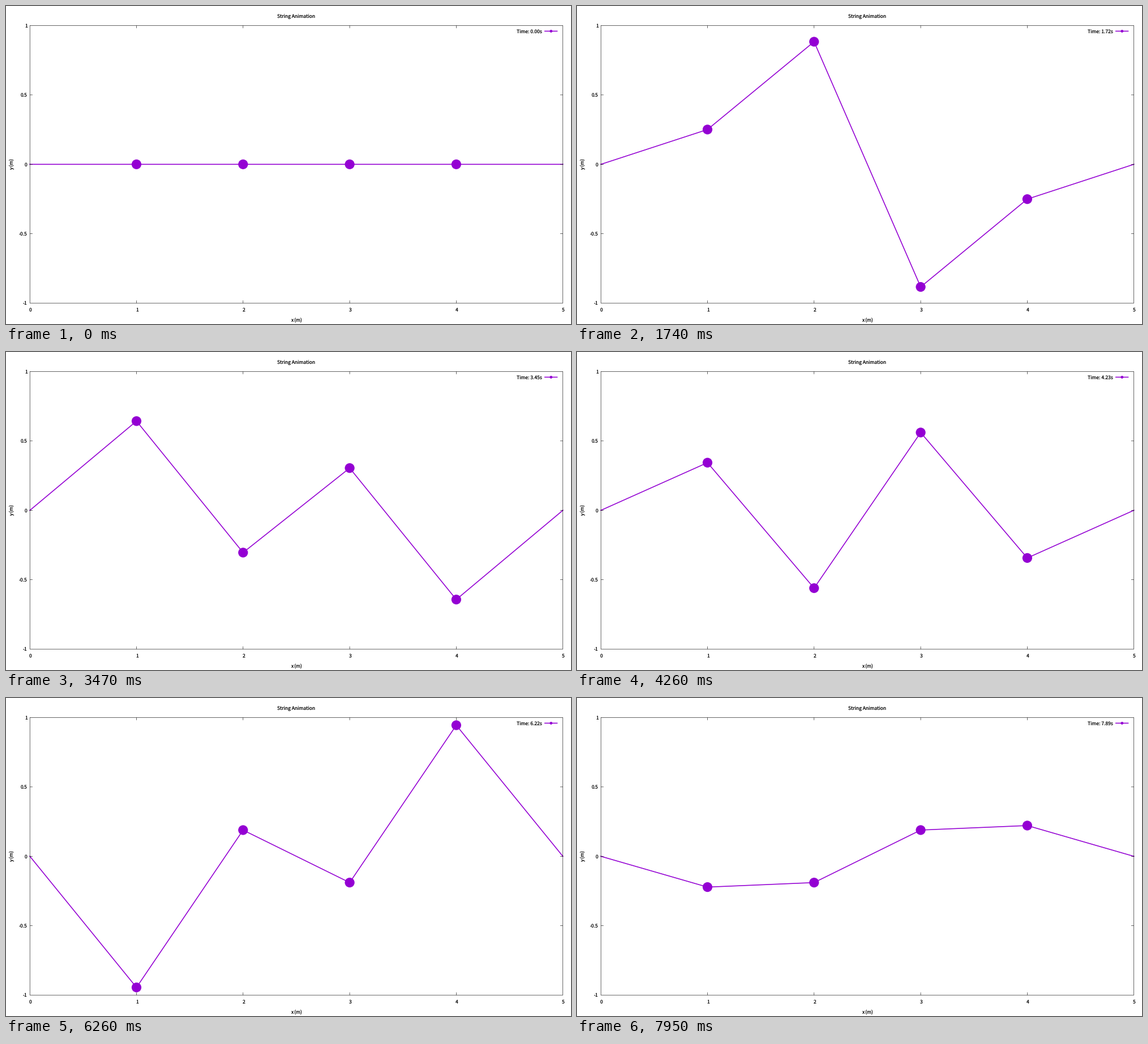
Write a matplotlib script that moves like this. It is 998x561 px and loops after 8000 ms.

```python
import numpy as np
import matplotlib.pyplot as plt
from matplotlib.animation import FuncAnimation
from matplotlib.patches import Circle

W, H, DPI = 998, 561, 64
PX = 72 / DPI                      # points per pixel
LOOP, TICK, RATE = 8000, 20, 19    # ms, ms, poses per second

LEFT, RIGHT, TOP, BOTTOM = 42.2, 983.65, 34.45, 524.15
VIOLET = "#9400d3"

# Four beads on a string with fixed ends, in normal modes 2 and 4
N = np.arange(6)
AMP = np.sqrt(2 / 5)


def omega(k):
    return 2 * np.sqrt(0.4) * np.sin(k * np.pi / 10)


DT = 2 * np.pi / omega(4) / 100


def shape(t):
    return AMP * sum(sign * np.sin(k * np.pi * N / 5) * np.sin(omega(k) * t)
                     for k, sign in ((2, 1), (4, -1)))


def px(x):
    return LEFT + (RIGHT - LEFT) * x / 5


def py(y):
    return (TOP + BOTTOM) / 2 - (BOTTOM - TOP) / 2 * y


plt.rcParams["font.family"] = "Noto Sans CJK JP"
plt.rcParams["text.hinting"] = "none"
fig = plt.figure(figsize=(W / DPI, H / DPI), dpi=DPI, facecolor="white")
ax = fig.add_axes([0, 0, 1, 1])
ax.set_xlim(0, W)
ax.set_ylim(H, 0)
ax.axis("off")


def label(x, y, s, ha="center", va="baseline", **kw):
    return ax.text(x, y, s, ha=ha, va=va, size=8.5 * PX, color="black", **kw)


def line(xs, ys, color="black", width=0.6, **kw):
    return ax.plot(xs, ys, color=color, lw=width * PX, snap=False,
                   solid_capstyle="butt", **kw)[0]


def rule(xs, ys):
    line(xs, ys, zorder=5, solid_joinstyle="miter")


def dot(x, y, radius):
    return ax.add_patch(Circle((x, y), radius, fc=VIOLET, lw=0, zorder=4))


# Frame, ticks and labels
rule([LEFT, RIGHT, RIGHT, LEFT, LEFT], [TOP, TOP, BOTTOM, BOTTOM, TOP])
for x in range(6):
    label(px(x) + 1, 539.2, str(x))
    if 0 < x < 5:
        rule([px(x)] * 2, [BOTTOM, BOTTOM - 4.7])
        rule([px(x)] * 2, [TOP, TOP + 4.7])
for y in (-1, -0.5, 0, 0.5, 1):
    label(37.7, py(y) + 3.2, f"{y:g}", ha="right")
    if abs(y) < 1:
        rule([LEFT, LEFT + 4.7], [py(y)] * 2)
        rule([RIGHT, RIGHT - 4.7], [py(y)] * 2)
label(512.7, 20.7, "String Animation")
label(512.7, 556.2, "x (m)")
label(10.3, 279.5, "y (m)", va="center", rotation=90)

# Key
clock = label(946.3, 47.8, "", ha="right")
line([951, 974.3], [44.4] * 2, VIOLET, 1.6)
dot(962.8, 44.4, 2.4)

# String and beads
string = line([], [], VIOLET, 1.6, solid_joinstyle="round", zorder=3)
beads = [dot(px(n), py(0), 8.6) for n in N[1:5]]
for end in (0, 5):
    dot(px(end), py(0), 1)

# Pose starts fall on whole hundredths of a second
starts = np.round(np.arange(LOOP * RATE // 1000) * 100 / RATE) * 10


def update(i):
    now = i * TICK + TICK / 2
    t = (np.searchsorted(starts, now, side="right") - 1) * DT
    xs, ys = px(N), py(shape(t))
    string.set_data(xs, ys)
    for bead, x, y in zip(beads, xs[1:], ys[1:]):
        bead.center = x, y
    clock.set_text(f"Time: {t:.2f}s")
    return [string, clock, *beads]


anim = FuncAnimation(fig, update, frames=LOOP // TICK, interval=TICK,
                     repeat=True, repeat_delay=0, blit=False)
plt.show()
```
